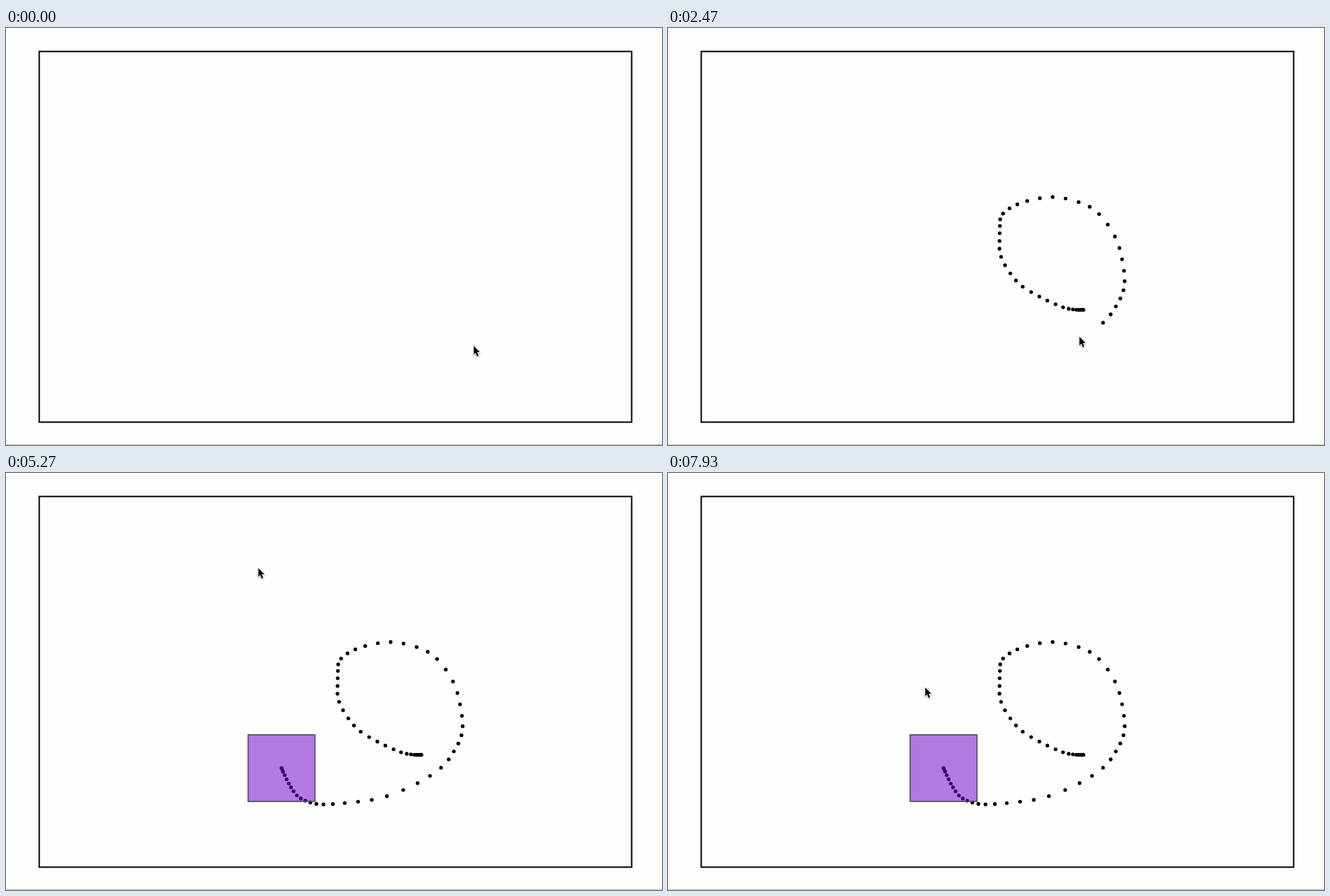
These frames come from a looping animation (938 px wide and 597 px high, 8 s). An HTML page with a canvas:

```html
<!DOCTYPE html>
<html lang="en">
<head>
<meta charset="utf-8">
<title>Drag trail</title>
<style>
html, body { margin: 0; width: 100%; height: 100%; overflow: hidden; background: #fdfdfc; }
canvas { display: block; }
</style>
</head>
<body>
<canvas id="stage" width="938" height="597"></canvas>
<script>
const ctx = document.getElementById('stage').getContext('2d');
const LOOP = 8000;
const DRAG_START = 16, DROP = 78, DRAG_END = 99;
const DOTS = 66, DOT_RADIUS = 2.65, SQUARE = 95.5;

// Smooth curve through [u, x, y] keys that never overshoots them.
function curve(keys) {
  const slope = (i, axis) =>
    (keys[i + 1][axis] - keys[i][axis]) / (keys[i + 1][0] - keys[i][0]);
  const tangent = (i, axis) => {
    if (i === 0 || i === keys.length - 1) return 0;
    const a = slope(i - 1, axis), b = slope(i, axis);
    return a * b > 0 ? 2 * a * b / (a + b) : 0;
  };
  return u => {
    const last = keys.length - 1;
    u = Math.min(Math.max(u, keys[0][0]), keys[last][0]);
    const i = Math.min(keys.filter(k => k[0] <= u).length, last) - 1;
    const h = keys[i + 1][0] - keys[i][0], p = (u - keys[i][0]) / h, q = 1 - p;
    return [1, 2].map(axis =>
      q * q * (1 + 2 * p) * keys[i][axis] + p * p * (3 - 2 * p) * keys[i + 1][axis] +
      h * p * q * (q * tangent(i, axis) - p * tangent(i + 1, axis)));
  };
}

// Where dot number u lies.
const trailAt = curve([
  [0, 594, 403.5], [4, 587, 403.5], [7, 573, 402], [11, 531, 384.5], [14, 497.5, 361.5],
  [18, 474, 316], [22, 475, 274], [25, 499.5, 252.5], [28, 550, 242], [31, 603, 256],
  [35, 645.5, 315], [38, 653, 362.5], [42, 633, 410], [45, 588.5, 444], [48, 523, 468],
  [52, 454, 474.5], [56, 421.5, 466], [59, 407.5, 450], [65, 394, 422.5]
]);
const trail = Array.from({ length: DOTS }, (_, n) => trailAt(n));

// Pointer before and after the drag, by step.
const approachAt = curve([[0, 668, 455], [8, 602, 403], [9, 608, 408]]);
const wanderAt = curve([
  [99, 393, 420], [102, 384, 450], [108, 310, 300], [113, 360, 136], [116, 576, 129],
  [119, 609, 290], [125, 420, 456], [131, 249, 315], [135, 290, 247], [140, 346, 222],
  [143, 342, 225], [156, 271, 244], [160, 271, 244], [170, 367, 307]
]);

// Updates come in threes, held for 20, 20 and 100 ms.
function stepAt(t) {
  if (t >= 450) t -= 50;
  return 3 * Math.floor(t / 140) + Math.min(2, Math.floor(t % 140 / 20));
}

// The first dots come quickly, then one per step.
function dotCount(step) {
  const k = Math.max(0, step - DRAG_START);
  return Math.min(DOTS, k + 7, Math.floor(k * 15 / 8));
}

function pointerAt(step) {
  if (step < DRAG_START) return approachAt(step);
  if (step >= DRAG_END) return wanderAt(step);
  const [x, y] = trailAt(dotCount(step) + 1);
  return [x - 1, y - 2];
}

const arrow = new Path2D('M.3 0V12.4L3 9.9 5.1 14.9 7.3 14 5.2 9.1H9Z');

function drawPointer([x, y]) {
  ctx.save();
  ctx.translate(x + .5, y);
  ctx.lineJoin = 'round';
  ctx.lineWidth = 1.6;
  ctx.strokeStyle = '#fff';
  ctx.shadowColor = 'rgba(0,0,0,.35)';
  ctx.shadowBlur = 2;
  ctx.shadowOffsetY = 1;
  ctx.stroke(arrow);
  ctx.shadowColor = 'transparent';
  ctx.fillStyle = '#000';
  ctx.fill(arrow);
  ctx.restore();
}

function drawSquare([x, y]) {
  const box = [x - SQUARE / 2, y - SQUARE / 2, SQUARE, SQUARE];
  ctx.fillStyle = 'rgba(108,0,202,.52)';
  ctx.fillRect(...box);
  ctx.strokeStyle = '#574c62';
  ctx.lineWidth = 1.7;
  ctx.strokeRect(...box);
}

function draw(t) {
  const step = stepAt(t);
  ctx.fillStyle = '#fdfdfc';
  ctx.fillRect(0, 0, 938, 597);
  ctx.fillStyle = '#b9b99c';
  ctx.fillRect(0, 596, 938, 1);
  ctx.strokeStyle = '#000';
  ctx.lineWidth = 2;
  ctx.strokeRect(47.5, 33.6, 847.1, 530.7);

  ctx.fillStyle = '#000';
  for (const [x, y] of trail.slice(0, dotCount(step))) {
    ctx.beginPath();
    ctx.arc(x, y, DOT_RADIUS, 0, 2 * Math.PI);
    ctx.fill();
  }
  if (step >= DROP) drawSquare(trail[DOTS - 1]);
  drawPointer(pointerAt(step));
}

const start = performance.now();
function tick() {
  draw((performance.now() - start) % LOOP);
  requestAnimationFrame(tick);
}
tick();
</script>
</body>
</html>
```
